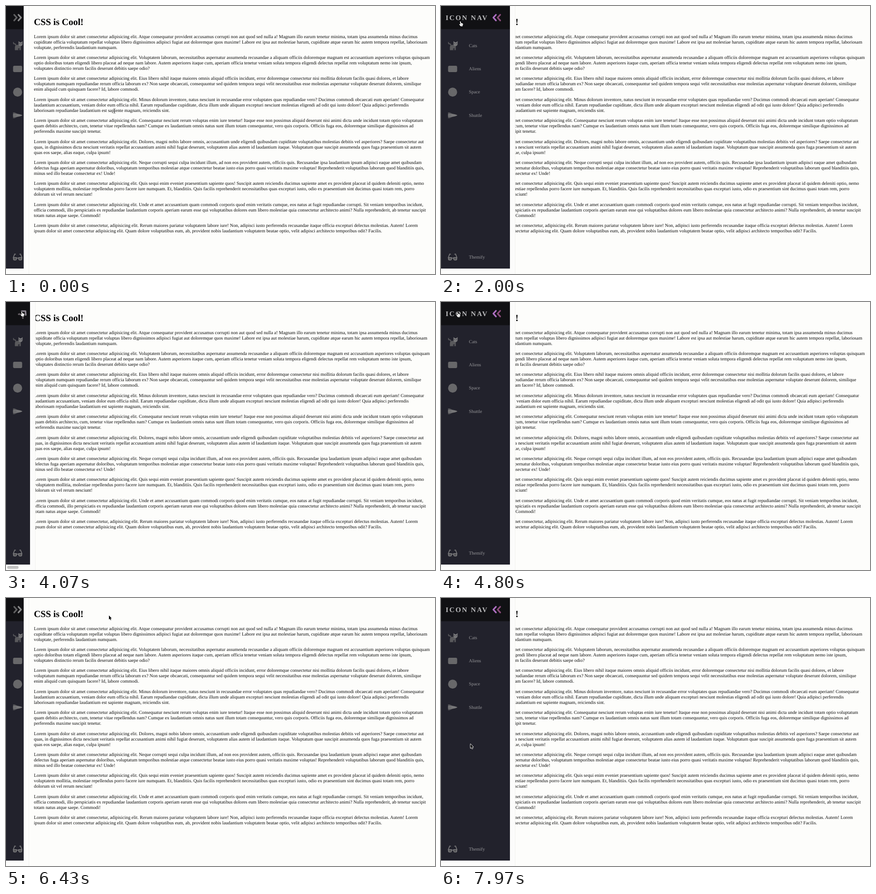
These frames come from a looping animation (946 px wide and 592 px high, 8000 ms). An HTML page with a canvas:

```html
<!DOCTYPE html>
<html lang="en">
<head>
<meta charset="utf-8">
<title>CSS is Cool!</title>
<style>
html, body { margin: 0; width: 100%; height: 100%; overflow: hidden; background: #fdfdfb; }
canvas { display: block; width: 100vw; height: 100vh; }
</style>
</head>
<body>
<canvas id="stage" width="946" height="592"></canvas>
<script>
const W = 946, H = 592, LOOP = 8000;
const REM = 10.26, SPEED = 600, GUTTER = 12, NAV_H = 580;
const CLOSED = 51, OPEN = 164, LABEL_END = 98;
const ctx = document.getElementById('stage').getContext('2d');

const paragraphs = `Lorem ipsum dolor sit amet consectetur adipisicing elit. Atque consequatur provident accusamus corrupti non aut quod sed nulla a! Magnam illo earum tenetur minima, totam ipsa assumenda minus ducimus
cupiditate officia voluptatum repellat voluptas libero dignissimos adipisci fugiat aut doloremque quos maxime! Labore est ipsa aut molestiae harum, cupiditate atque earum hic autem tempora repellat, laboriosam
voluptate, perferendis laudantium numquam.

Lorem ipsum dolor sit amet consectetur adipisicing elit. Voluptatem laborum, necessitatibus aspernatur assumenda recusandae a aliquam officiis doloremque magnam est accusantium asperiores voluptas quisquam
optio doloribus totam eligendi libero placeat ad neque nam labore. Autem asperiores itaque cum, aperiam officia tenetur veniam soluta tempora eligendi delectus repellat rem voluptatum nemo iste ipsum,
voluptates distinctio rerum facilis deserunt debitis saepe odio?

Lorem ipsum dolor sit amet consectetur adipisicing elit. Eius libero nihil itaque maiores omnis aliquid officiis incidunt, error doloremque consectetur nisi mollitia dolorum facilis quasi dolores, et labore
voluptatum numquam repudiandae rerum officia laborum ex? Non saepe obcaecati, consequuntur sed quidem tempora sequi velit necessitatibus esse molestias aspernatur voluptate deserunt dolorem, similique
enim aliquid cum quisquam facere? Id, labore commodi.

Lorem ipsum dolor sit amet consectetur adipisicing elit. Minus dolorum inventore, natus nesciunt in recusandae error voluptates quas repudiandae vero? Ducimus commodi obcaecati eum aperiam! Consequatur
laudantium accusantium, veniam dolor eum officia nihil. Earum repudiandae cupiditate, dicta illum unde aliquam excepturi nesciunt molestias eligendi ad odit qui iusto dolore! Quia adipisci perferendis
laboriosam repudiandae laudantium est sapiente magnam, reiciendis sint.

Lorem ipsum dolor sit amet consectetur adipisicing elit. Consequatur nesciunt rerum voluptas enim iure tenetur! Itaque esse non possimus aliquid deserunt nisi animi dicta unde incidunt totam optio voluptatum
quam debitis architecto, cum, tenetur vitae repellendus nam? Cumque ex laudantium omnis natus sunt illum totam consequuntur, vero quis corporis. Officiis fuga eos, doloremque similique dignissimos ad
perferendis maxime suscipit tenetur.

Lorem ipsum dolor sit amet consectetur adipisicing elit. Dolores, magni nobis labore omnis, accusantium unde eligendi quibusdam cupiditate voluptatibus molestias debitis vel asperiores? Saepe consectetur aut
quas, in dignissimos dicta nesciunt veritatis repellat accusantium animi nihil fugiat deserunt, voluptatem alias autem id laudantium itaque. Voluptatum quae suscipit assumenda quos fuga praesentium sit autem
quas eos saepe, alias eaque, culpa ipsum!

Lorem ipsum dolor sit amet consectetur adipisicing elit. Neque corrupti sequi culpa incidunt illum, ad non eos provident autem, officiis quis. Recusandae ipsa laudantium ipsum adipisci eaque amet quibusdam
delectus fuga aperiam aspernatur doloribus, voluptatum temporibus molestiae atque consectetur beatae iusto eius porro quasi veritatis maxime voluptas! Reprehenderit voluptatibus laborum quod blanditiis quis,
minus sed illo beatae consectetur ex! Unde!

Lorem ipsum dolor sit amet consectetur adipisicing elit. Quis sequi enim eveniet praesentium sapiente quos! Suscipit autem reiciendis ducimus sapiente amet ex provident placeat id quidem deleniti optio, nemo
voluptatem mollitia, molestiae repellendus porro facere iure numquam. Et, blanditiis. Quis facilis reprehenderit necessitatibus quas excepturi iusto, odio ex praesentium sint ducimus quasi totam rem, porro
dolorum sit vel rerum nesciunt!

Lorem ipsum dolor sit amet consectetur adipisicing elit. Unde et amet accusantium quam commodi corporis quod enim veritatis cumque, eos natus at fugit repudiandae corrupti. Sit veniam temporibus incidunt,
officia commodi, illo perspiciatis ex repudiandae laudantium corporis aperiam earum esse qui voluptatibus dolores eum libero molestiae quia consectetur architecto animi? Nulla reprehenderit, ab tenetur suscipit
totam natus atque saepe. Commodi!

Lorem ipsum dolor sit amet consectetur, adipisicing elit. Rerum maiores pariatur voluptatem labore iure! Non, adipisci iusto perferendis recusandae itaque officia excepturi delectus molestias. Autem! Lorem
ipsum dolor sit amet consectetur adipisicing elit. Quam dolore voluptatibus eum, ab, provident nobis laudantium voluptatem beatae optio, velit adipisci architecto temporibus odit? Facilis.`
  .split('\n\n').map(p => p.split('\n'));

const links = [['Cats', 87.2], ['Aliens', 138.5], ['Space', 189.8], ['Shuttle', 241.1], ['Themify', 554.5]];
const hovers = [[980, 2455], [4000, 5684], [7017, 9000]];

// time, x, y of the pointer
const route = [
  [0, 239, 232], [450, 239, 232], [980, 52, 45], [1170, 40, 38], [2300, 45, 40],
  [2455, 164, 55], [2800, 337, 77], [3500, 337, 77], [4000, 52, 30], [4070, 36, 27],
  [5500, 40, 30], [5684, 164, 38], [5870, 227, 43], [6500, 227, 43], [7017, 52, 36],
  [7170, 32, 33], [7320, 33, 36], [7640, 65, 327], [8000, 65, 327]
];

const lerp = (a, b, k) => a + (b - a) * k;

// cubic-bezier(.25, .1, .25, 1)
function ease(x) {
  if (x <= 0) return 0;
  if (x >= 1) return 1;
  const curve = (a, b, s) => 3 * a * s * (1 - s) ** 2 + 3 * b * s * s * (1 - s) + s ** 3;
  let lo = 0, hi = 1;
  for (let i = 0; i < 24; i++) {
    const mid = (lo + hi) / 2;
    if (curve(.25, .25, mid) < x) lo = mid; else hi = mid;
  }
  return curve(.1, 1, lo);
}

function openness(t) {
  let k = 0;
  for (const [enter, leave] of hovers) {
    if (t >= enter) k = ease((t - enter) / SPEED) - ease((t - leave) / SPEED);
  }
  return k;
}

function pointerAt(t) {
  const i = Math.max(1, route.findIndex(p => p[0] > t));
  const [t0, x0, y0] = route[i - 1], [t1, x1, y1] = route[i];
  const k = (t - t0) / (t1 - t0), s = k * k * (3 - 2 * k);
  return { x: lerp(x0, x1, s), y: lerp(y0, y1, s) };
}

function font(size, weight = 'normal', spacing = 0) {
  ctx.font = `${weight} ${size}px "Liberation Serif", Times, serif`;
  ctx.letterSpacing = spacing + 'px';
  ctx.textRendering = 'geometricPrecision';
}

function text(str, x, y, color) {
  ctx.fillStyle = color;
  ctx.fillText(str, x, y);
}

function rect(x, y, w, h, color) {
  ctx.fillStyle = color;
  ctx.fillRect(x, y, w, h);
}

function shape(d, color) {
  ctx.fillStyle = color;
  ctx.fill(new Path2D(d));
}

function line(d, color, width) {
  ctx.strokeStyle = color;
  ctx.lineWidth = width;
  ctx.stroke(new Path2D(d));
}

function at(x, y, draw) {
  ctx.save();
  ctx.translate(x, y);
  ctx.lineCap = ctx.lineJoin = 'round';
  draw();
  ctx.restore();
}

function mix(a, b, k) {
  return `rgb(${a.map((v, i) => Math.round(lerp(v, b[i], k)))})`;
}

const LIGHT = '#777779', DIM = '#59595c';

const icons = [
  function cat() {
    line('M-4 9 V-1 Q-4 -4 -7 -4 Q-9.5 -4 -9 -7', DIM, 2);
    shape('M-6 10 V3 Q-5 -2 3 -2 L7 0 V10 H4 V5 L0 8 H2 V10 Z', DIM);
    shape('M2 -10 L5 -7.5 H8 L11 -10 V-3 Q10 1 6.5 1 Q2 1 2 -3 Z', LIGHT);
    rect(4, -5, 1.3, 1.3, '#23232e');
    rect(8, -5, 1.3, 1.3, '#23232e');
  },
  function alien() {
    shape('M-7 -7 H7 Q10 -7 10 -4 V4 Q10 7 7 7 H-7 Q-10 7 -10 4 V-4 Q-10 -7 -7 -7 Z', '#68686a');
  },
  function station() {
    ctx.beginPath();
    ctx.arc(0, 0, 10, 0, Math.PI * 2);
    ctx.fillStyle = '#68686a';
    ctx.fill();
  },
  function shuttle() {
    shape('M-10 -6.5 L-6 -6 L4 -1.5 V1.5 L-6 6 L-10 6.5 Z', DIM);
    shape('M-10 -3 H1 Q8 -2 10.5 0 Q8 2 1 3 H-10 Z', LIGHT);
    line('M-9 0 H-3', DIM, 1);
  },
  function glasses() {
    line('M-9.5 1 L-6.5 -7 L-4.5 -6.5 M9.5 1 L6.5 -7 L4.5 -6.5 M-2 2 H2', LIGHT, 1.8);
    shape('M-10 0 H-1.5 V4 Q-2 7 -5 7 H-7 Q-10 7 -10 4 Z M10 0 H1.5 V4 Q2 7 5 7 H7 Q10 7 10 4 Z', LIGHT);
    shape('M-8 2 H-3.3 V4 Q-4 5.3 -6 5.3 Q-8 5 -8 3 Z M8 2 H3.3 V4 Q4 5.3 6 5.3 Q8 5 8 3 Z', '#48484b');
  }
];

function drawPage() {
  rect(0, 0, W, H, '#fdfdfb');
  font(REM * 2, 'bold');
  text('CSS is Cool!', 61.5, 42.3, '#000');
  font(REM);
  paragraphs.forEach((lines, p) => lines.forEach((str, i) =>
    text(str, 61.5, 70.7 + p * 46.36 + i * 12.03, '#0a0a0a')));
}

function drawLogo(k, turn) {
  font(15.4, 'bold', 2.31);
  text('ICON NAV', 10.2 - 640 * (1 - k), 30.8, '#bababc');
  at(25.6 + 97.4 * k, 25.7, () => {
    ctx.rotate(-Math.PI * turn);
    line('M-7.6 -6.3 L-1.8 0 L-7.6 6.3', mix([98, 98, 99], [140, 76, 122], k), 3.4);
    line('M1.8 -6.3 L7.6 0 L1.8 6.3', mix([138, 138, 139], [174, 112, 194], k), 3.4);
  });
}

function drawNav(k, turn, hovered) {
  const full = lerp(CLOSED, OPEN, k), inner = full - GUTTER;
  rect(0, 0, full, H, '#fcfcfb');
  rect(full - 1, 0, 1, H, '#f1f1ee');
  ctx.save();
  ctx.beginPath();
  ctx.rect(0, 0, inner, NAV_H);
  ctx.clip();
  rect(0, 0, inner, NAV_H, '#22222c');
  rect(0, 0, inner, 51.3, '#111114');
  drawLogo(k, turn);
  links.forEach(([label, y], i) => {
    at(25.6, y + .4, icons[i]);
    if (!hovered) return;
    font(REM);
    text(label, 61.6, y + 3.4, '#98989b');
  });
  ctx.restore();
  if (hovered && inner < LABEL_END) {
    ctx.beginPath();
    ctx.roundRect(2.5, 583, (inner - 3.5) ** 2 / LABEL_END, 6.5, 3.2);
    ctx.fillStyle = '#c3c3c3';
    ctx.fill();
  }
  return full;
}

function overText({ x, y }) {
  if (y > 26 && y < 48) return x < 171;
  const row = y - 61.5;
  return row > 0 && row < 442 && row % 46.36 < 36;
}

function drawPointer(pos, navWidth) {
  const inNav = pos.x < navWidth;
  at(pos.x, pos.y, () => {
    if (inNav && pos.y < 51.3) {
      const hand = 'M-2.4 -5.5 Q-1.3 -6.5 -.6 -5 L.2 -2 L3.5 -1.2 Q4.8 -.8 4.4 1 L3.4 5 H-.8 L-4 1.2 Q-4.2 -.2 -2.6 .3 L-1.4 1 Z';
      line(hand, '#000', 1.6);
      shape(hand, '#fff');
      line('M1 1.5 V3.5 M2.6 1.5 V3.5', '#444', .5);
    } else if (!inNav && overText(pos)) {
      line('M-2 -5 Q0 -5 0 -3.5 Q0 -5 2 -5 M0 -4 V4 M-2 5 Q0 5 0 3.5 Q0 5 2 5 M-1 1.8 H1', '#555', .9);
    } else {
      const arrow = 'M0 -4.5 V4.6 L2 2.7 L3.5 6 L4.9 5.4 L3.5 2.2 H6.2 Z';
      line(arrow, '#fff', 1.6);
      shape(arrow, '#000');
    }
  });
}

function frame(now) {
  const t = now % LOOP;
  const hovered = hovers.some(([enter, leave]) => t >= enter && t < leave);
  drawPage();
  const width = drawNav(openness(t), openness(t + 40), hovered);
  drawPointer(pointerAt(t), width);
  requestAnimationFrame(frame);
}

requestAnimationFrame(frame);
</script>
</body>
</html>
```
